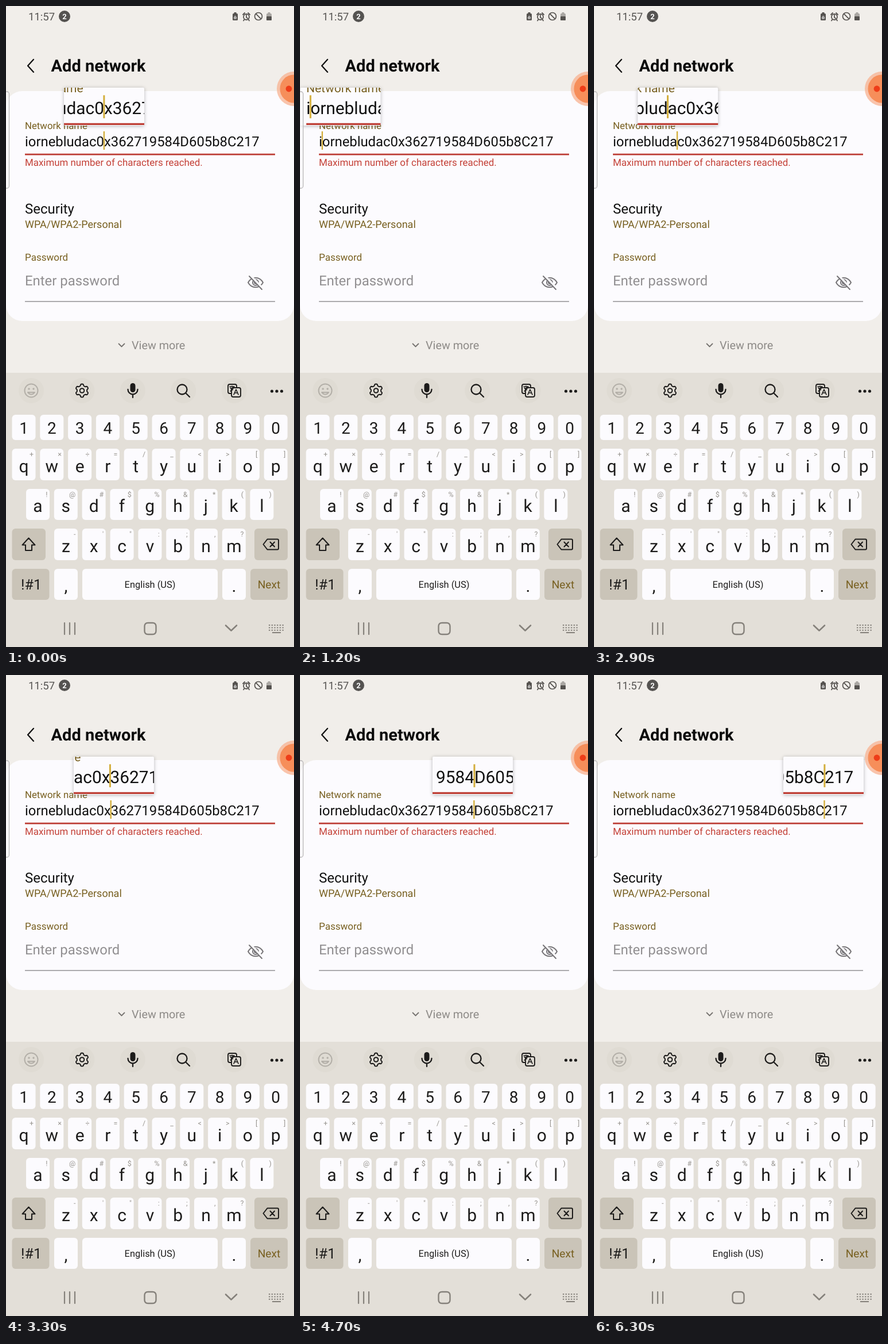
An HTML page with a canvas for the animation above (6400 ms loop, 502 by 1115 pixels).

```html
<!DOCTYPE html>
<html lang="en">
<head>
<meta charset="utf-8">
<title>Add network</title>
<style>
  html, body { margin: 0; width: 100%; height: 100%; overflow: hidden; background: #f1eeea; }
  canvas { display: block; }
</style>
</head>
<body>
<canvas id="stage" width="502" height="1115"></canvas>
<script>
const ctx = document.getElementById('stage').getContext('2d');
ctx.textRendering = 'geometricPrecision';
const LOOP = 6400, STEP = 100, ZOOM = 1.25;
const TEXT_X = 33, NAME_SIZE = 23.85, NAME = 'iornebludac0x362719584D605b8C217';
const INK = '#1d1c1b', GOLD = '#786020', CARD = '#fcfbfe';

// Finger position along the text: [ms, x]
const FINGER = [[0, 171], [700, 95], [1100, 43], [1200, 42], [1700, 42], [2400, 90], [3200, 180],
  [3300, 188], [4600, 299], [4700, 301], [5500, 398], [5600, 410], [5800, 419], [5900, 430],
  [6100, 430], [6200, 405], [6300, 400], [6400, 400]];

function fingerAt(t) {
  const i = Math.max(1, FINGER.findIndex(key => key[0] >= t));
  const [t0, x0] = FINGER[i - 1], [t1, x1] = FINGER[i];
  return x0 + (x1 - x0) * (t - t0) / (t1 - t0);
}

const font = (size, weight = 400) => `${weight} ${size}px Roboto, sans-serif`;

function text(str, x, y, size, color, align = 'left', weight = 400) {
  ctx.font = font(size, weight);
  ctx.fillStyle = color;
  ctx.textAlign = align;
  ctx.fillText(str, x, y);
}

function rect(x, y, w, h, color, radius = 0) {
  ctx.fillStyle = color;
  ctx.beginPath();
  ctx.roundRect(x, y, w, h, radius);
  ctx.fill();
}

function disc(x, y, r, color) {
  ctx.fillStyle = color;
  ctx.beginPath();
  ctx.arc(x, y, r, 0, 7);
  ctx.fill();
}

// Path data is relative to (x, y)
function icon(x, y, data, color, width = 2) {
  ctx.save();
  ctx.translate(x, y);
  ctx.lineWidth = width;
  ctx.lineCap = ctx.lineJoin = 'round';
  ctx.strokeStyle = color;
  ctx.stroke(new Path2D(data));
  ctx.restore();
}

const ring = r => `M${-r} 0a${r} ${r} 0 1 0 ${2 * r} 0a${r} ${r} 0 1 0 ${-2 * r} 0z`;

ctx.font = font(NAME_SIZE);
const CARETS = Array.from({ length: NAME.length + 1 },
  (_, i) => TEXT_X + ctx.measureText(NAME.slice(0, i)).width);

const caretFor = x => CARETS.reduce((best, c) => Math.abs(c - x) < Math.abs(best - x) ? c : best);

function nameField(caretX) {
  text('Network name', TEXT_X, 214, 16.8, GOLD);
  text(NAME, TEXT_X, 244, NAME_SIZE, '#111');
  rect(33, 256.7, 436, 2.7, '#bd3d34');
  rect(caretX - 1.2, 218, 2.4, 32, '#d3ae3c');
}

function statusBar() {
  text('11:57', 39, 24.5, 18.5, '#555351');
  disc(102, 18, 10, '#555351');
  text('2', 102, 22.5, 13, '#fff', 'center', 700);
  const gray = '#55524f';
  rect(395, 13, 9, 12, gray, 1.5);
  rect(397.5, 11, 4, 3, gray);
  icon(399.5, 19, 'M-2 1L0-2L2 1zM-2 3h4', '#eee', 1);
  icon(419, 19, ring(5), gray, 1.8);
  icon(419, 19, 'M0-3V1L2.5 2.5M-6-4L-3-7M6-4L3-7M-4 5L-5 6.5M4 5L5 6.5', gray, 1.8);
  icon(440, 18, ring(6.5) + 'M-4.6-4.6L4.6 4.6', gray, 1.7);
  rect(454, 13, 9, 12, '#aaa7a3', 1.5);
  rect(456.5, 11, 4, 2.5, '#aaa7a3');
  rect(454, 18, 9, 7, gray, 1);
}

function form(caretX) {
  icon(43, 104, 'M5-11L-5 0L5 11', '#111', 2.3);
  text('Add network', 78.5, 114, 29, '#0b0b0b', 'left', 700);
  rect(0, 148, 502, 400, CARD, 28);
  nameField(caretX);
  text('Maximum number of characters reached.', TEXT_X, 278, 16.9, '#c44037');
  text('Security', TEXT_X, 361, 24, '#111');
  text('WPA/WPA2-Personal', TEXT_X, 386, 18, GOLD);
  text('Password', TEXT_X, 443, 17, GOLD);
  text('Enter password', TEXT_X, 486, 23.9, '#918f91');
  rect(33, 513.2, 436, 1.6, '#929093');
  icon(435, 481, 'M-13 0C-7-11 7-11 13 0C7 11-7 11-13 0z' + ring(5), '#777578');
  disc(435, 481, 3, '#777578');
  icon(435, 481, 'M-9-12L12 10', CARD, 4);
  icon(435, 481, 'M-11-11L11 12', '#777578');
  icon(201.5, 590, 'M-5-2.5L0 2.5L5-2.5', '#777471', 1.8);
  text('View more', 219, 597, 19.8, '#8d8a87');
}

function toolbar() {
  for (let i = 0; i < 5; i++) disc(44 + 88.4 * i, 669, 22, '#dfdbd3');
  icon(44, 669, ring(11.5) + 'M-6 3Q0 10 6 3z', '#b3afa8');
  disc(40, 666, 1.7, '#b3afa8');
  disc(48, 666, 1.7, '#b3afa8');

  let gear = '';
  for (let i = 0; i < 60; i++) {
    const a = i * Math.PI / 30, r = 10 + 1.4 * Math.tanh(-2.5 * Math.cos(6 * a));
    gear += `${i ? 'L' : 'M'}${r * Math.cos(a)} ${r * Math.sin(a)}`;
  }
  icon(132.5, 669, gear + 'z' + ring(3.8), INK);

  rect(216.5, 656, 9, 16, INK, 4.5);
  icon(221, 669, 'M-8.5-2a8.5 8.5 0 0 0 17 0M0 7V12', INK, 2.3);
  icon(307, 667, ring(8.5) + 'M6.2 6.2L13 13', INK, 2.3);
  icon(398, 669, 'M4-6V-8Q4-11 1-11H-8Q-11-11-11-8V2Q-11 5-8 5H-5M-2-5H8Q11-5 11-2V8Q11 11 8 11H-2Q-5 11-5 8V-2Q-5-5-2-5z', INK, 1.9);
  icon(398, 669, 'M-1 7L3-2L7 7M.5 4H5.5M-8-7H0M-4-8V-7M-7 1Q-2-2-1-7M-7-5Q-5-2-3-1', INK, 1.6);
  for (const x of [463.5, 472, 480.5]) disc(x, 670, 2.6, INK);
}

function keyRow(x, y, h, letters, hints, size, baseline) {
  [...letters].forEach((letter, i) => {
    const left = x + 48.8 * i;
    rect(left, y, 41, h, CARD, 6);
    text(letter, left + 20.5, baseline, size, INK, 'center');
    if (hints) text(hints[i], left + 37.5, y + 14, 12.5, '#98958f', 'right');
  });
}

function keyboard() {
  const dark = '#cac4b8';
  rect(0, 638, 502, 477, '#e3dfd8');
  toolbar();
  keyRow(10.5, 711, 44, '1234567890', '', 28, 743.5);
  keyRow(10.5, 770, 55, 'qwertyuiop', '+×÷=/_<>[]', 30, 811);
  keyRow(35, 840, 54, 'asdfghjkl', '!@#$%&*()', 30, 880);
  keyRow(84, 909, 55, 'zxcvbnm', '-\'":;,?', 30, 949.5);
  rect(10.5, 909, 58.5, 55, dark, 6);
  icon(39.5, 936.5, 'M0-11L11 1H5.5V10.5H-5.5V1H-11z', INK, 2);
  rect(433, 909, 58, 55, dark, 6);
  icon(462, 936.5, 'M-13.5 0L-6.5-9H11Q13-9 13-7V7Q13 9 11 9H-6.5zM-1.5-4L6 4M6-4L-1.5 4', INK, 2);

  rect(10.5, 979, 65, 54, dark, 6);
  text('!#1', 44, 1015, 25, INK, 'center');
  rect(84, 979, 41, 54, CARD, 6);
  text(',', 104.5, 1019, 30, INK, 'center');
  rect(133, 979, 236, 54, CARD, 6);
  text('English (US)', 251, 1012, 16.4, INK, 'center');
  rect(377, 979, 41, 54, CARD, 6);
  text('.', 397.5, 1019, 30, INK, 'center');
  rect(426, 979, 65, 54, dark, 6);
  text('Next', 458.5, 1013, 19.2, GOLD, 'center');
}

function navBar() {
  const gray = '#85817b';
  icon(111, 1083, 'M-9-10V10M0-10V10M9-10V10', gray, 2.2);
  icon(251.5, 1083, 'M-4-10H4Q10-10 10-4V4Q10 10 4 10H-4Q-10 10-10 4V-4Q-10-10-4-10z', gray, 2.4);
  icon(392.5, 1082, 'M-9.5-4.5L0 4.5L9.5-4.5', gray, 2.6);
  for (let row = 0; row < 3; row++)
    for (let col = 0; col < 6; col++) rect(458 + 4.7 * col, 1076 + 4.4 * row, 2.3, 2, gray);
  rect(464, 1089, 15, 2, gray);
}

function magnifier(finger, caretX) {
  const center = Math.max(finger, 70.5), source = Math.max(finger, 80.6);
  ctx.save();
  ctx.shadowColor = 'rgba(0,0,0,.28)';
  ctx.shadowBlur = 6;
  ctx.shadowOffsetY = 1;
  rect(center - 70, 142, 140, 66, CARD, 2);
  ctx.restore();
  ctx.save();
  ctx.beginPath();
  ctx.roundRect(center - 70, 142, 140, 66, 2);
  ctx.clip();
  ctx.translate(center, 187.8);
  ctx.scale(ZOOM, ZOOM);
  ctx.translate(-source, -244);
  nameField(caretX);
  ctx.restore();
}

function overlays() {
  ctx.beginPath();
  ctx.roundRect(-10, 149, 15.5, 168, 4);
  ctx.fillStyle = 'rgba(250,249,250,.6)';
  ctx.fill();
  ctx.strokeStyle = '#b9b7b8';
  ctx.lineWidth = 1.3;
  ctx.stroke();
  disc(502, 144, 30, 'rgba(248,178,145,.75)');
  disc(502, 144, 24.5, '#f68e5a');
  disc(493, 144, 5.4, '#ee3d18');
}

function draw() {
  const t = Math.floor(performance.now() % LOOP / STEP) * STEP;
  const finger = fingerAt(t);
  rect(0, 0, 502, 1115, '#f1eeea');
  statusBar();
  form(caretFor(finger));
  keyboard();
  navBar();
  // The magnified copy shows the caret one step late
  magnifier(finger, caretFor(fingerAt(Math.max(0, t - STEP))));
  overlays();
  requestAnimationFrame(draw);
}
draw();
</script>
</body>
</html>
```
